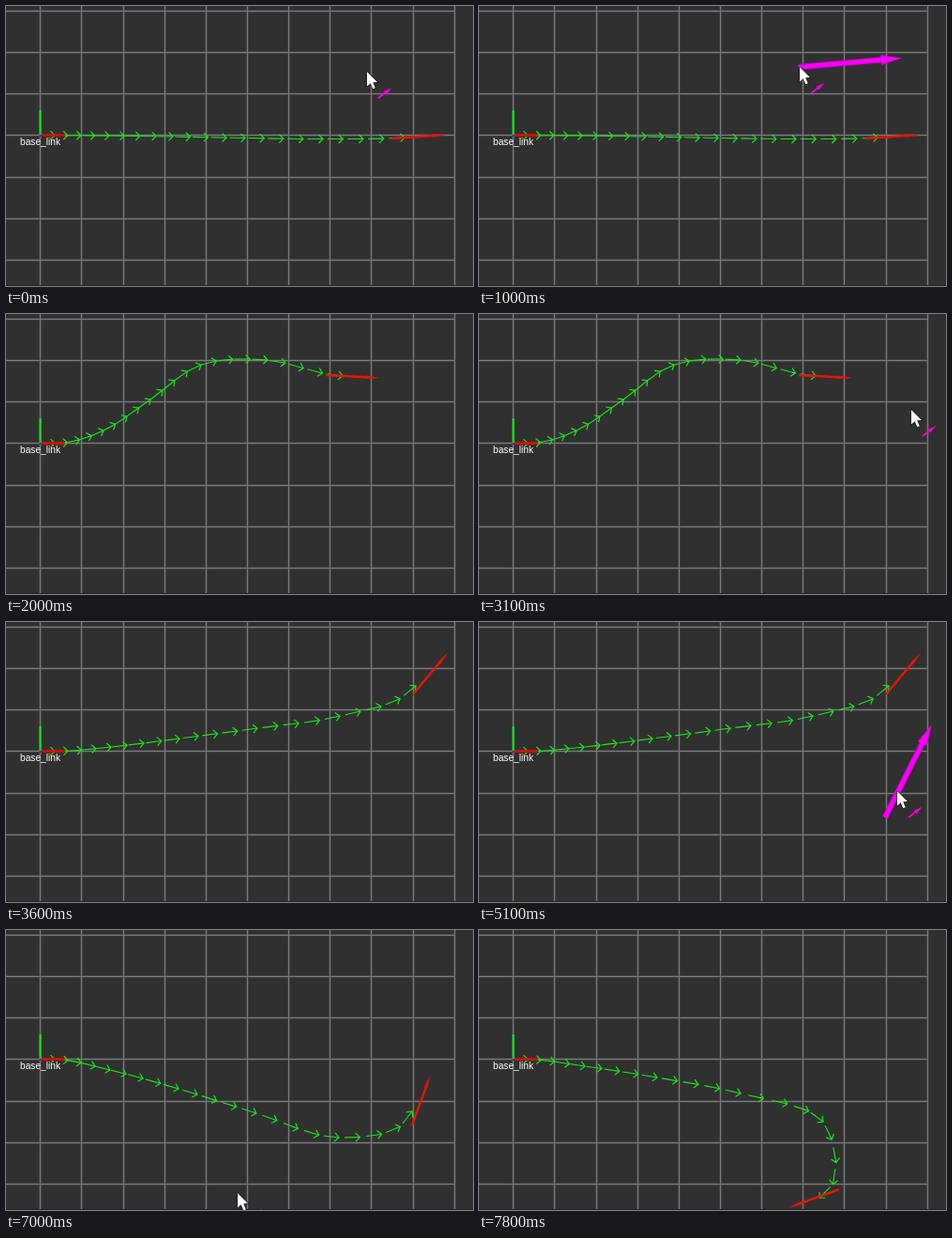
An HTML page with a canvas for the animation above (8 s loop, 498 by 298 pixels).

```html
<!DOCTYPE html>
<html>
<head>
<meta charset="utf-8">
<style>
html, body { margin: 0; width: 100%; height: 100%; overflow: hidden; background: #303030; }
canvas { display: block; }
</style>
</head>
<body>
<canvas id="stage" width="498" height="298"></canvas>
<script>
const ctx = document.getElementById('stage').getContext('2d');
const LOOP = 8000, STEP = 100, SPAN = 4;

// Dragging from press to set turns the arrow from one angle to the goal's;
// the new route follows at plan. Points are every fourth arrow tip.
const goals = [
  { press: 0, set: 0, plan: 0, tail: [412, 141], from: -4, angle: -4,
    route: [[110, 138], [178, 139], [255, 140.5], [338, 141.5], [425, 140]] },
  { press: 900, set: 1200, plan: 1400, tail: [341, 65], from: -9, angle: 3,
    route: [[104, 124], [154, 91], [208, 54], [279, 49], [359, 66]] },
  { press: 3300, set: 3500, plan: 3600, tail: [434, 77], from: -46, angle: -50,
    route: [[112, 133], [185, 124], [268, 113], [356, 100], [437, 68]] },
  { press: 5000, set: 5400, plan: 5500, tail: [433, 208], from: -61, angle: -70,
    route: [[111, 149], [184, 169], [267, 195], [355, 221], [433, 193]] },
  { press: 7500, set: 7700, plan: 7800, tail: [384, 276], from: 165, angle: 160,
    route: [[113, 145], [190, 157], [279, 174], [367, 204], [363, 285]] }
];

// Straight cursor moves; it rests after each one until the next or until hidden.
const moves = [
  { t: [0, 100], a: [385, 70], b: [387, 71] },
  { t: [300, 900], a: [387, 71], b: [342, 65] },
  { t: [1000, 1200], a: [342, 65], b: [400, 68], hide: 1200 },
  { t: [1800, 1900], a: [448, 45], b: [465, 57], hide: 2000 },
  { t: [3000, 3100], a: [480, 102], b: [461, 102] },
  { t: [3300, 3400], a: [435, 77], b: [452, 56], hide: 3500 },
  { t: [4700, 5000], a: [455, 242], b: [434, 208] },
  { t: [5000, 5200], a: [434, 208], b: [458, 152], hide: 5400 },
  { t: [6600, 7000], a: [203, 103], b: [247, 280] },
  { t: [7100, 7200], a: [247, 280], b: [275, 282] },
  { t: [7300, 7500], a: [275, 282], b: [384, 276] },
  { t: [7500, 7700], a: [384, 276], b: [332, 295], hide: 7700 }
];

const rad = deg => deg * Math.PI / 180;
const lerp = (a, b, u) => a + (b - a) * u;
const progress = (t, a, b) => Math.min(1, Math.max(0, (t - a) / (b - a)));
const latest = (list, time) => list.filter(time).pop();

function line(color, width, ...p) {
  ctx.strokeStyle = color;
  ctx.lineWidth = width;
  ctx.beginPath();
  for (let i = 0; i < p.length; i += 2) ctx.lineTo(p[i], p[i + 1]);
  ctx.stroke();
}

function fill(color, ...p) {
  ctx.fillStyle = color;
  ctx.beginPath();
  for (let i = 0; i < p.length; i += 2) ctx.lineTo(p[i], p[i + 1]);
  ctx.fill();
}

function placed(x, y, angle, paint) {
  ctx.save();
  ctx.translate(x, y);
  ctx.rotate(angle);
  paint();
  ctx.restore();
}

// Solid arrow with neck distance n, half widths s (shaft) and h (head).
function solidArrow(color, [x, y], deg, len, n, s, h) {
  placed(x, y, rad(deg), () =>
    fill(color, 0, -s, n, -s, n, -h, len, 0, n, h, n, s, 0, s));
}

function hermite(a, da, b, db, u) {
  const v = 1 - u;
  return v * v * ((1 + 2 * u) * a + u * da) + u * u * ((3 - 2 * u) * b - v * db);
}

// Leaves the base heading right and arrives with the goal's heading.
function drawRoute({ route, angle }) {
  const knots = [[52, 137.7], ...route], last = route.length;
  const end = [90 * Math.cos(rad(angle)), 90 * Math.sin(rad(angle))];
  const slope = (i, k) => i == 0 ? [54, 0][k] : i == last ? end[k]
    : (knots[i + 1][k] - knots[i - 1][k]) / 2;
  let prev = [36.5, 137.7];
  for (let n = 0; n <= last * SPAN; n++) {
    const i = Math.min(Math.floor(n / SPAN), last - 1), u = n / SPAN - i;
    const [x, y] = [0, 1].map(k =>
      hermite(knots[i][k], slope(i, k), knots[i + 1][k], slope(i + 1, k), u));
    placed(x, y, Math.atan2(y - prev[1], x - prev[0]), () => {
      line('#1be61b', 1.1, -16.5, 0, 0, 0);
      line('#1be61b', 1.2, -4.5, -4.5, 0, 0, -4.5, 4.5);
    });
    prev = [x, y];
  }
}

function drawGrid() {
  ctx.fillStyle = '#303030';
  ctx.fillRect(0, 0, 498, 298);
  for (const [color, soft] of [['#414142', 1], ['#7a7a7c', 0]]) {
    ctx.fillStyle = color;
    for (let i = 0; i < 11; i++)
      ctx.fillRect(Math.floor(36.75 + 44.14 * i) - soft, 0, 1 + 2 * soft, 298);
    for (let i = 0; i < 7; i++)
      ctx.fillRect(0, Math.floor(5.45 + 44.15 * i) - soft, 478, 1 + 2 * soft);
  }
  ctx.fillStyle = '#242424';
  ctx.fillRect(0, 297, 498, 1);
}

function drawBase() {
  line('#d80c08', 2.8, 37, 137.6, 63, 137.6);
  line('#10e810', 2.2, 36.6, 111, 36.6, 137);
  ctx.fillStyle = '#2828c8';
  ctx.fillRect(35.5, 137, 2, 2);
  ctx.fillStyle = '#fff';
  ctx.font = '10.2px "Liberation Sans", Arial, sans-serif';
  ctx.fillText('base_link', 15, 147.5);
}

function drawDrag(t, { press, set, tail, from, angle }) {
  const deg = lerp(from, angle, progress(t, press, set));
  solidArrow('#c800c8', tail, deg, 110, 88, 3.2, 5.6);
  solidArrow('#fa00fa', tail, deg, 110, 88, 2, 4);
}

function drawCursor(t) {
  const { t: [start, stop], a, b, hide } = latest(moves, m => m.t[0] <= t);
  if (t >= hide) return;
  const u = progress(t, start, stop);
  placed(lerp(a[0], b[0], u), lerp(a[1], b[1], u), 0, () => {
    const shape = [0, 0, 0, 15.5, 3.7, 12.3, 6.3, 18.3, 8.8, 17.2, 6.2, 11.3, 11, 11, 0, 0];
    line('#181818', 1.4, ...shape);
    fill('#fff', ...shape);
    solidArrow('#f000d0', [12, 28], -38, 18, 9, 0.9, 2.2);
  });
}

function draw(now) {
  const t = Math.floor(now % LOOP / STEP) * STEP;
  drawGrid();
  drawRoute(latest(goals, g => g.plan <= t));
  drawBase();
  const goal = latest(goals, g => g.set <= t);
  solidArrow('#e81408', goal.tail, goal.angle, 58, 43, 1.2, 1.7);
  const drag = goals.find(g => g.press <= t && t < g.set);
  if (drag) drawDrag(t, drag);
  drawCursor(t);
}

const start = performance.now();
function tick() {
  draw(performance.now() - start);
  requestAnimationFrame(tick);
}
tick();
</script>
</body>
</html>
```
